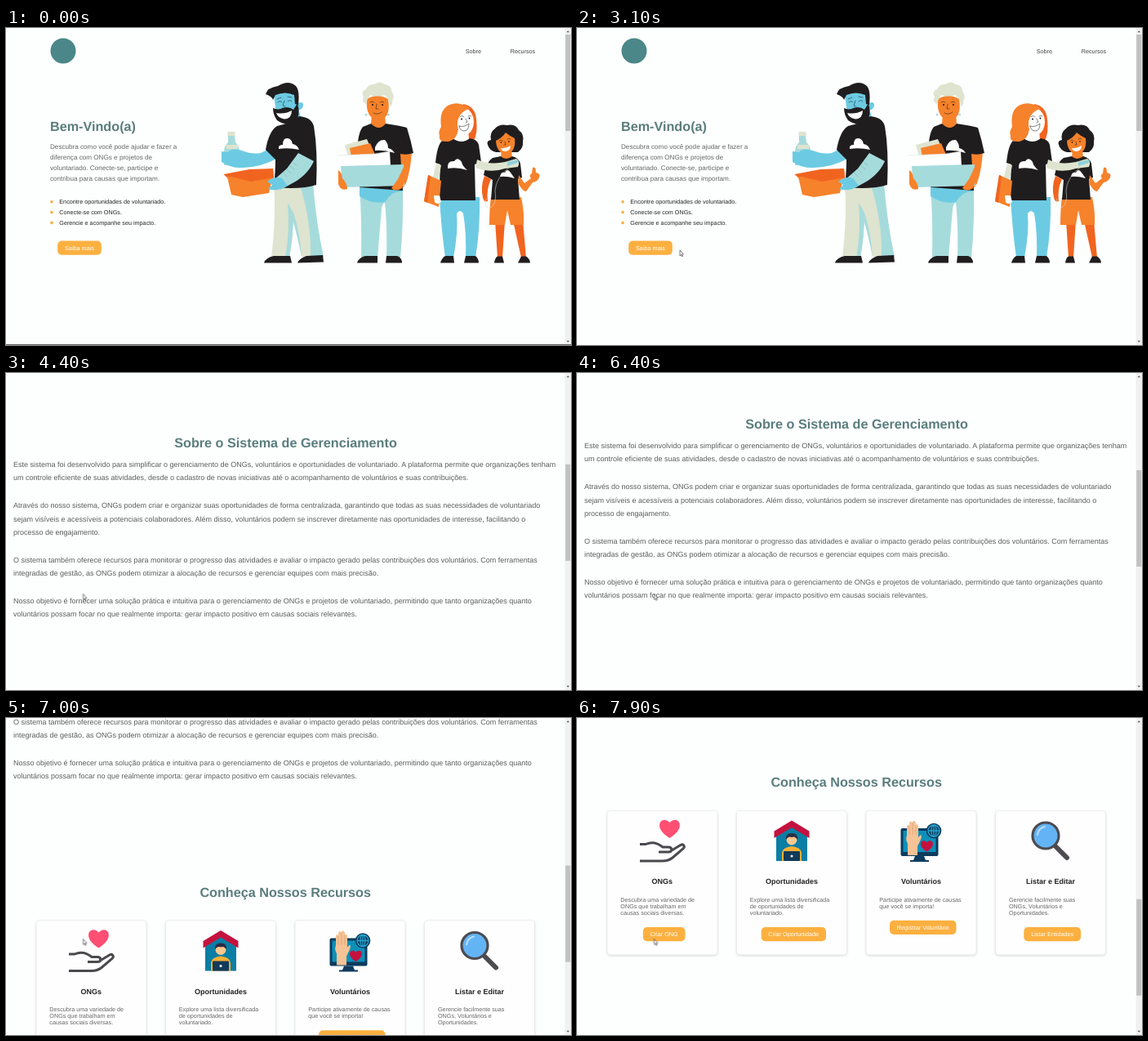
These frames come from a looping animation (692 px wide and 388 px high, 8000 ms). An HTML page:

```html
<!DOCTYPE html>
<html lang="pt">
<head>
<meta charset="utf-8">
<title>Voluntariado</title>
<style>
@property --s { syntax: '<number>'; inherits: true; initial-value: 0; }
html, body { margin: 0; width: 100%; height: 100%; overflow: hidden; background: #fdfefe; }
svg { display: block; width: 692px; height: 388px; animation: scroll 8s step-end infinite;
  font: 7.23px "Liberation Sans", Arial, sans-serif; text-rendering: geometricPrecision; }
#page { transform: translateY(calc(var(--s) * -1px)); }
#thumb { transform: translateY(calc(var(--s) * .3065px)); }
.h { font-size: 16.21px; font-weight: 700; fill: #5b7d7d; }
.nav { fill: #444; }
.lead { font-size: 8.13px; fill: #666; }
.list { fill: #222; }
.body { font-size: 9.01px; fill: #5c5c5c; }
.name { font-size: 9px; font-weight: 700; fill: #222; }
.desc { fill: #666; }
.mid { text-anchor: middle; }
.btn rect { fill: #fbb040; }
.btn text { fill: #fff; text-anchor: middle; font-size: 7.28px; }
.card { fill: #fefefe; stroke: #e2e4e4; stroke-width: .6; filter: drop-shadow(0 1px 1.5px #0002); }
.k { fill: #201d1f } .b { fill: #6ccbe2 } .l { fill: #a6dbdc } .g { fill: #dee4cf }
.o { fill: #f6822b } .r { fill: #f1641f } .w { fill: #fff }
.line { fill: none; stroke: #201d1f; stroke-width: .55; stroke-linecap: round; }
.line.light { stroke: #d5e4dc; }
#hover { transform-box: fill-box; transform-origin: center; animation: hover 8s infinite; }
#hover rect { animation: tint 8s infinite; }
#cursor { animation: move 8s step-end infinite; }
#arrow { animation: arrow 8s step-end infinite; }
#hand { animation: hand 8s step-end infinite; }
#lens { animation: lens 8s step-end infinite; }
#edge { animation: edge 8s step-end infinite; }
@keyframes scroll {
  0% { --s: 0 } 48.75% { --s: 36 } 50% { --s: 104 } 51.25% { --s: 192 }
  52.5% { --s: 268 } 53.75% { --s: 320 } 55%, 78.75% { --s: 339 }
  80% { --s: 362; animation-timing-function: steps(6) }
  87.5% { --s: 563; animation-timing-function: steps(4) }
  92.5% { --s: 645; animation-timing-function: steps(5) }
  98.75%, 100% { --s: 697.5 }
}
@keyframes move {
  0% { transform: translate(560px, 392px); animation-timing-function: steps(9) }
  11.25% { transform: translate(470px, 235px); animation-timing-function: steps(2) }
  13.75% { transform: translate(450px, 226px) }
  15% { transform: translate(450px, 226px); animation-timing-function: steps(6) }
  22.5% { transform: translate(413.5px, 193px) }
  27.5% { transform: translate(413.5px, 193px); animation-timing-function: steps(9) }
  38.75% { transform: translate(126px, 272px); animation-timing-function: steps(6) }
  46.25%, 100% { transform: translate(94.5px, 270.5px) }
}
@keyframes hover {
  0%, 41.25% { transform: none; filter: drop-shadow(0 0 0 #0000) }
  45%, 60% { transform: scale(1.055); filter: drop-shadow(.5px 1px 1px #0006) }
  61%, 100% { transform: none; filter: drop-shadow(0 0 0 #0000) }
}
@keyframes tint { 0%, 41.25%, 61%, 100% { fill: #fbb040 } 45%, 60% { fill: #f8a12f } }
@keyframes arrow { 0% { opacity: 1 } 41.25% { opacity: 0 } 50%, 100% { opacity: 1 } }
@keyframes hand { 0% { opacity: 0 } 41.25% { opacity: 1 } 50%, 100% { opacity: 0 } }
@keyframes lens { 0% { opacity: 0 } 8.75% { opacity: 1 } 33.75%, 100% { opacity: 0 } }
@keyframes edge { 0% { opacity: 1 } 1.25%, 100% { opacity: 0 } }
</style>
</head>
<body>
<svg viewBox="0 0 692 388">
<defs><path id="heart" d="M0 11C-22-2-10-18 0-8 10-18 22-2 0 11Z"/></defs>
<g id="page">
  <circle cx="70" cy="28" r="15.5" fill="#4b8789"/>
  <g class="nav"><text x="562.7" y="31.4">Sobre</text><text x="617.7" y="31.4">Recursos</text></g>
  <text class="h" x="54" y="126.4">Bem-Vindo(a)</text>
  <g class="lead">
    <text x="54" y="148.3">Descubra como você pode ajudar e fazer a</text>
    <text x="54" y="161.2">diferença com ONGs e projetos de</text>
    <text x="54" y="174.1">voluntariado. Conecte-se, participe e</text>
    <text x="54" y="187">contribua para causas que importam.</text>
  </g>
  <g fill="#f9ae45"><circle cx="56" cy="212.8" r="1.8"/><circle cx="56" cy="225.6" r="1.8"/><circle cx="56" cy="238.4" r="1.8"/></g>
  <g class="list">
    <text x="65.3" y="215.4">Encontre oportunidades de voluntariado.</text>
    <text x="65.3" y="228.2">Conecte-se com ONGs.</text>
    <text x="65.3" y="241">Gerencie e acompanhe seu impacto.</text>
  </g>
  <g class="btn" id="hover"><rect x="63.2" y="260.6" width="53.6" height="17.2" rx="5"/><text x="90" y="271.6">Saiba mais</text></g>

  <!-- bearded man -->
  <g>
    <path class="l" d="M352 192L376 190Q380 240 389 280L362 280Q355 245 345 214Z"/>
    <path class="g" d="M328 192L360 192Q374 238 373 280L362 280Q360 250 352 226Q352 255 347 281L325 281Q331 230 328 192Z"/>
    <path class="l" d="M345 214L352 226Q352 255 347 281L342 281Q348 250 345 214Z"/>
    <path class="k" d="M316 287.500Q318 281 328 279L348 279L350 287.500ZM357 287.500Q359 282 368 279L388 278L389 286.500Z"/>
    <path class="l" d="M272 132L280 132L281 140Q286 144 286 152L285 168L267 168L267 152Q267 144 272 140Z"/>
    <path class="g" d="M271.500 127h9v5h-9zM270 143h14v5h-14z"/>
    <path class="b" d="M324 147L312 153Q301 155 289 150Q276 146 272 152L264 151L264 164Q276 172 290 171Q314 170 331 160Z"/>
    <path class="b" d="M346 104L357 96L362 112L348 122Z"/>
    <path class="k" d="M332 120Q347 117 359 108Q374 109 377 120Q382 150 380 192Q362 198 328 195Q330 175 330 161L318 149Q322 126 332 120Z"/>
    <path class="w" d="M334 148Q333 143 339 143Q339 134 345 135Q350 136 351 142Q357 143 359 149Q346 146 334 148Z"/>
    <path class="b" d="M328 82Q343 76 357 82L358 92Q364 89 364 95Q363 101 357 100L355 108Q343 116 331 104Z"/>
    <path class="k" d="M318 81Q320 73 333 71Q346 63 355 71Q360 76 358 94L354 93L353 82Q342 77 330 82L327 88Q326 84 318 81Z"/>
    <path class="k" d="M327 98Q333 101 340 97.500Q347 96 352 100L357 92Q361 106 355 114Q343 121 332 113Q327 106 327 98Z"/>
    <path class="w" d="M331 104Q341 106 350 101Q350 111 341 111.500Q333 110 331 104Z"/>
    <path class="line" d="M333 91q3-3 5 0M345 90q3-3 5 0M332 87l5-2M345 84l5 1M341 89l-2 6 3 1"/>
    <path class="r" d="M266.500 179L298 173L327 172L328 184L276 188Z"/>
    <path class="o" d="M271 182L327 180L322 202L290 207L276 204Z"/>
    <path class="r" d="M327 172L328 183L300 188L268 180Z"/>
    <path class="l" d="M358 153L377 163Q369 181 349 191L336 198L328 186L344 172Z"/>
    <path class="b" d="M320 188Q328 181 338 184L345 193Q332 201 321 197L326 192Z"/>
    <path class="line" d="M352 165l4 3M348 169l5 4M344 173l5 5M340 177l4 5" stroke-opacity=".25"/>
  </g>

  <!-- grey-haired woman -->
  <g>
    <path class="l" d="M433 194L486 194Q487 240 483 281L466 281Q467 240 464 214Q461 214 460 222L455 281L435 281Q436 235 433 194Z"/>
    <path class="b" d="M433 193L486 193L486 200Q472 199 464 213Q448 216 433 206Z"/>
    <path class="k" d="M430 287.500Q432 281 440 279L455 279L455 287.500ZM466 279L479 279Q485 281 485 287.500L465 287.500Z"/>
    <path class="o" d="M448 104L464 104L465 118Q457 127 447 118ZM483 150L497 151Q496 172 490 190Q483 202 475 197Q472 188 477 176Z"/>
    <path class="k" d="M447 117Q457 127 465 117Q485 120 491 122Q496 138 499 153Q491 156 483 154L486 199L433 195L435 152L430 151Q431 128 437 121Z"/>
    <path class="w" d="M452 146Q456 136 464 137Q468 141 468 147Q473 148 476 153Q464 149 452 150Z"/>
    <path class="o" d="M442 87Q455 79 468 87Q472 111 456 113Q440 111 442 87Z"/>
    <path class="g" d="M441 93Q435 90 438 84Q434 78 441 75Q444 68 451 69Q458 64 464 69Q472 70 472 77Q477 84 473 89Q474 94 470 96Q470 88 464 82Q454 85 446 82Q442 87 441 93Z"/>
    <path class="line" d="M446 91q3-2 5 0M458 91q3-2 5 0M454 93l-1 6 3 0M450 104q5 3 10-1"/>
    <circle cx="449" cy="94" r=".9"/><circle cx="461" cy="94" r=".9"/>
    <circle class="l" cx="441" cy="106" r="1.500"/><circle class="l" cx="468.500" cy="106" r="1.500"/>
    <path class="g" d="M415 143L442 136L455 166L422 168Z"/>
    <path class="o" d="M421 147L446 141L456 164L425 168Z"/>
    <path class="w" d="M406 156L452 154L470 151L471 169L411 171Z"/>
    <path class="line light" d="M406 156L452 154L470 151"/>
    <path class="l" d="M410 169L487 167L488 193L412 195Z"/>
    <path class="o" d="M489 166Q492 182 485 196Q477 201 472 196L480 185ZM407 174Q411 176 412 184Q418 190 418 197Q410 200 407 191Z"/>
  </g>

  <!-- red-haired woman -->
  <g>
    <path class="b" d="M531 207L580 207Q581 245 575 281L563 281Q564 250 560 227Q556 221 552 227Q554 250 548 281L538 281Q533 245 531 207Z"/>
    <path class="k" d="M532 287.500Q534 281 538 279L548 279L549 287.500ZM563 279L575 279Q579 282 579 287.500L561 287.500Z"/>
    <path class="r" d="M560 93Q575 96 576 112Q578 128 573 138L560 136Z"/>
    <path class="w" d="M549 124L566 124L567 137Q558 144 548 137Z"/>
    <path class="k" d="M547 135Q558 143 568 135Q577 136 579 143L582 164L574 167L575 211L530 211L532 167L526 165Q528 144 534 138Z"/>
    <path class="w" d="M541 170Q541 162 549 163Q553 157 558 164Q559 169 565 174Q553 170 541 172Z"/>
    <path class="w" d="M550 107Q555 98 564 98Q573 104 573 115Q572 130 561 131Q551 129 550 117Z"/>
    <path class="o" d="M569 99Q562 99 556 107Q551 115 554 124Q552 137 542 139Q529 140 531 132Q529 127 533 121Q530 100 543 94Q556 89 569 99Z"/>
    <path class="line" d="M555 120Q561 122 567 117Q567 126 561 126Q556 126 555 120Z"/>
    <path class="line" d="M556 109q2-3 5 0M566 108q2-2 4 0M563 111l2 4-2 1"/>
    <circle cx="558" cy="111.500" r=".9"/><circle cx="567.500" cy="110.500" r=".9"/>
    <path class="g" d="M527 166L533 168Q529 190 525 205L519 207Q522 183 527 166Z"/>
    <path class="o" d="M517 180L533 187L530 219L512 212Z"/>
    <path class="r" d="M512 212L517 180L520 181L516 214Z"/>
    <path class="w" d="M524 205L531 205L533 213Q528 217 525 213Z"/>
  </g>

  <!-- girl -->
  <g>
    <path class="r" d="M599 236L611 236L608 281L602 281ZM621 236L633 236L637 281L631 281Z"/>
    <path class="k" d="M598 287.500Q599 281 602 279.500L608 279.500L610 287.500ZM627 287.500L631 279.500L637 279.500Q642 283 642 287.500Z"/>
    <path class="o" d="M594 207L631 207Q635 226 634 241L618 241L614 223L611 241L592 241Q592 222 594 207Z"/>
    <path class="k" d="M590 143Q588 138 594 137Q592 128 599 123Q604 117 614 119Q624 117 628 125Q635 130 633 139Q634 147 627 152L600 152Q592 150 590 143Z"/>
    <path class="o" d="M607 148L619 148L620 160L606 160Z"/>
    <path class="k" d="M606 157Q612 163 620 157Q628 159 630 166L632 183L627 185L629 210L594 210L596 186L585 180Q588 164 596 159Z"/>
    <path class="o" d="M600 138Q608 134 612 128Q618 133 623 135Q625 150 614 155Q601 154 600 138Z"/>
    <path class="w" d="M606 147Q612 148 618 144Q618 150 612 151Q607 151 606 147Z"/>
    <path class="line" d="M604 138q2-2 4 0M614 136q2-2 4 0M611 139l1 4-2 0"/>
    <circle cx="606.500" cy="140" r=".8"/><circle cx="616" cy="139" r=".8"/>
    <path class="w" d="M605 182Q606 176 611 177Q614 171 618 177L623 184Q613 181 605 182Z"/>
    <path class="r" d="M586 181L594 185Q588 198 590 212Q585 214 584 207Q581 194 586 181Z"/>
    <path class="o" d="M628 180L635 190L643 184Q640 180 644 178L645 171Q649 169 649 177Q655 178 653 183Q651 188 645 189L637 200Q633 200 627 190Z"/>
    <path class="g" d="M577 161Q592 168 611 164L625 160Q630 163 627 170L611 172Q594 178 575 171Z"/>
    <path class="b" d="M614 164L628 161L627 165L614 169Z" opacity=".7"/>
    <path class="line light" d="M617 170Q600 183 599 199Q602 216 592 221Q585 218 588 209"/>
  </g>

  <g id="lens">
    <rect x="271" y="74" width="14" height="14" rx="2" fill="#555"/>
    <path class="w" d="M277.600 78.200Q274.500 78.500 274.400 81Q274.600 83.700 277.600 83.800ZM278.400 78.200Q281.500 78.500 281.600 81Q281.400 83.700 278.400 83.800Z"/>
  </g>

  <g transform="translate(0 339)">
    <text class="h mid" x="342.500" y="90.800">Sobre o Sistema de Gerenciamento</text>
    <g class="body">
      <text x="9" y="115.200">Este sistema foi desenvolvido para simplificar o gerenciamento de ONGs, voluntários e oportunidades de voluntariado. A plataforma permite que organizações tenham</text>
      <text x="9" y="131.400">um controle eficiente de suas atividades, desde o cadastro de novas iniciativas até o acompanhamento de voluntários e suas contribuições.</text>
      <text x="9" y="165.200">Através do nosso sistema, ONGs podem criar e organizar suas oportunidades de forma centralizada, garantindo que todas as suas necessidades de voluntariado</text>
      <text x="9" y="181.500">sejam visíveis e acessíveis a potenciais colaboradores. Além disso, voluntários podem se inscrever diretamente nas oportunidades de interesse, facilitando o</text>
      <text x="9" y="197.700">processo de engajamento.</text>
      <text x="9" y="231.900">O sistema também oferece recursos para monitorar o progresso das atividades e avaliar o impacto gerado pelas contribuições dos voluntários. Com ferramentas</text>
      <text x="9" y="248.100">integradas de gestão, as ONGs podem otimizar a alocação de recursos e gerenciar equipes com mais precisão.</text>
      <text x="9" y="282.100">Nosso objetivo é fornecer uma solução prática e intuitiva para o gerenciamento de ONGs e projetos de voluntariado, permitindo que tanto organizações quanto</text>
      <text x="9" y="298.300">voluntários possam focar no que realmente importa: gerar impacto positivo em causas sociais relevantes.</text>
    </g>
  </g>

  <g transform="translate(0 697.5)">
    <text class="h mid" x="342.200" y="84">Conheça Nossos Recursos</text>
    <g class="card">
      <rect x="37" y="113.300" width="135" height="176.500" rx="4"/><rect x="195.500" y="113.300" width="135" height="176.500" rx="4"/>
      <rect x="354" y="113.300" width="135" height="176.500" rx="4"/><rect x="512.500" y="113.300" width="135" height="176.500" rx="4"/>
    </g>

    <use href="#heart" x="113.500" y="136" fill="#ff4f72"/>
    <path d="M77 154.500H84C92 151 99 153 105 158H112C117 158 117 164 112 164H100M116 162L126 156C130 153 133 157 130 160L117 171Q112 175 105 175H77" fill="none" stroke="#4a4a4e" stroke-width="3"/>

    <path d="M244 143L263 130L282 143V175H244Z" fill="#0a7ea4"/>
    <path d="M241.500 147V138.500L263 125.500L284.500 138.500V147L263 134Z" fill="#c4123f"/>
    <path d="M251 175V165Q252 158 263 157Q274 158 275 165V175Z" fill="#fbb033"/>
    <circle cx="263" cy="149" r="6.500" fill="#fcc98f"/>
    <path d="M256 149Q255 141 263 141Q271 141 270 149Q267 144 263 146Q259 144 256 149Z" fill="#2b2d42"/>
    <rect x="253" y="163" width="20" height="12" rx="1" fill="#123a5a"/><circle cx="263" cy="169" r="1.500" class="w"/>

    <rect x="396.500" y="135" width="46" height="34" rx="2" fill="#0d3b5e"/>
    <rect x="399.500" y="138" width="40" height="26" fill="#0c90b8"/>
    <path d="M414 169H425L427 174H431V176H408V174H412Z" fill="#0d3b5e"/>
    <path d="M405 168V154Q402 148 404 144V132Q405 129 407 132V128Q409 125 411 128V127Q413 124 415 128V131Q418 128 418 133V146L421 143Q423 145 420 151L417 157V168Z" fill="#f5c396"/>
    <path d="M407 132V143M411 128V143M415 131V143" stroke="#d99d70" stroke-width=".7"/>
    <use href="#heart" transform="translate(428.500 157) scale(.6)" fill="#c4123f"/>
    <circle cx="437" cy="138" r="9.300" fill="#0d3b5e"/>
    <g fill="none" stroke="#28a5cf" stroke-width="1.300"><circle cx="437" cy="138" r="7"/><ellipse cx="437" cy="138" rx="3" ry="7"/><path d="M430 138h14M437 131v14"/></g>

    <path d="M587 158L600 171" stroke="#4d4b50" stroke-width="6" stroke-linecap="round"/>
    <circle cx="574" cy="144" r="16" fill="#63b4f5" stroke="#4d4b50" stroke-width="3.200"/>
    <path d="M564 143Q565 135 573 133" fill="none" stroke="#b9defb" stroke-width="2" stroke-linecap="round"/>

    <g class="name mid">
      <text x="104.300" y="203">ONGs</text><text x="262.900" y="203">Oportunidades</text>
      <text x="421.500" y="203">Voluntários</text><text x="580" y="203">Listar e Editar</text>
    </g>
    <g class="desc">
      <text x="53.300" y="224.500">Descubra uma variedade de</text><text x="53.300" y="232.700">ONGs que trabalham em</text><text x="53.300" y="240.900">causas sociais diversas.</text>
      <text x="211.800" y="224.500">Explore uma lista diversificada</text><text x="211.800" y="232.700">de oportunidades de</text><text x="211.800" y="240.900">voluntariado.</text>
      <text x="370.300" y="224.500">Participe ativamente de causas</text><text x="370.300" y="232.700">que você se importa!</text>
      <text x="529" y="224.500">Gerencie facilmente suas</text><text x="529" y="232.700">ONGs, Voluntários e</text><text x="529" y="240.900">Oportunidades.</text>
    </g>
    <g class="btn">
      <rect x="80.800" y="256" width="51.700" height="17.200" rx="5"/><text x="106.600" y="267">Criar ONG</text>
      <rect x="225.700" y="256" width="79.300" height="17.200" rx="5"/><text x="265.200" y="267">Criar Oportunidade</text>
      <rect x="383" y="247.800" width="81.500" height="17.200" rx="5"/><text x="423.700" y="258.800">Registrar Voluntário</text>
      <rect x="547.300" y="256" width="69.700" height="17.200" rx="5"/><text x="582.200" y="267">Listar Entidades</text>
    </g>
  </g>
</g>

<rect x="684.500" width="7.500" height="388" fill="#f1f1f1"/>
<rect id="thumb" x="685.200" y="8" width="6" height="118" fill="#c1c1c1"/>
<path d="M686.500 5.200L688.300 3.200L690.100 5.200ZM686.500 382.800L688.300 384.800L690.100 382.800Z" fill="#555"/>
<rect id="edge" y="387" width="692" height="1" fill="#666"/>

<g id="cursor" class="w" stroke="#222" stroke-width=".6" stroke-linejoin="round">
  <path id="arrow" d="M0 0V6.800L1.500 5.500L2.500 7.800L3.500 7.400L2.500 5.100H4.500Z"/>
  <path id="hand" d="M-.6 .6Q0-.3 .6 .6V3.200L3.600 3.900Q4.200 4.200 4 5.500L3.300 8.500H-.7L-2.500 5.500Q-2.200 4.400-1.300 5.200L-.6 5.800Z"/>
</g>
</svg>
</body>
</html>
```
